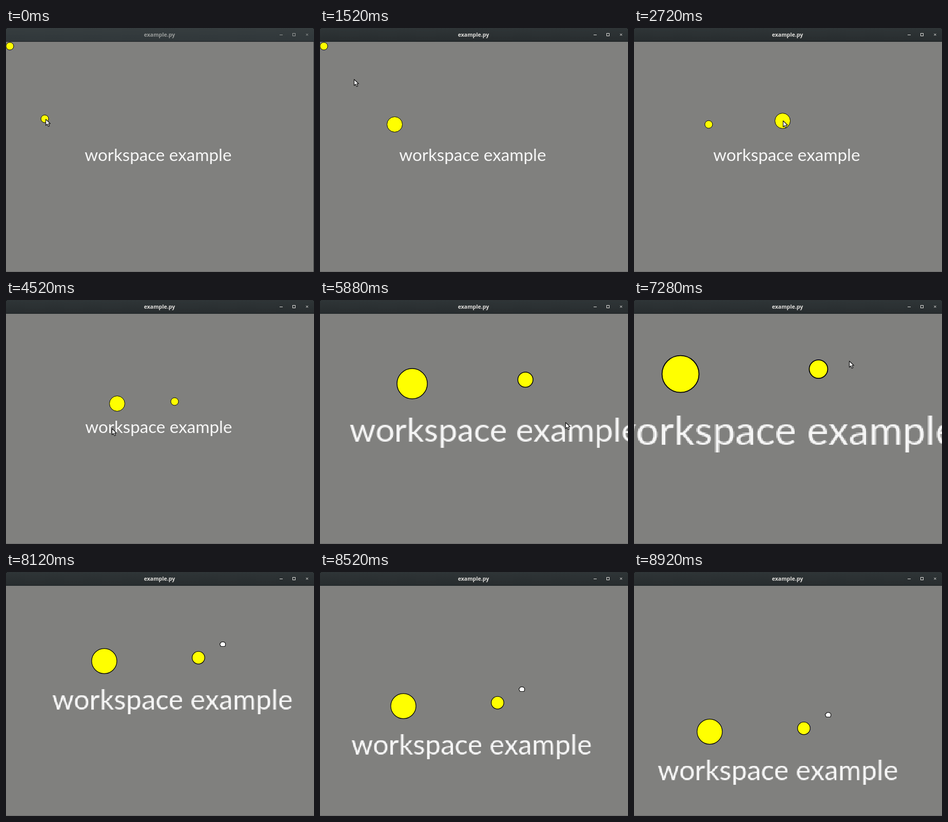
Recreate the animation shown at these times as an HTML page with a canvas. Size 600 px wide and 477 px high, loop 9 s.

```html
<!DOCTYPE html>
<html lang="en">
<head>
<meta charset="utf-8">
<title>example.py</title>
<style>
  html, body { margin: 0; width: 100%; height: 100%; overflow: hidden; background: #80807e; }
  canvas { display: block; }
</style>
</head>
<body>
<canvas id="stage" width="600" height="477"></canvas>
<script>
const W = 600, H = 477, BAR = 27, LOOP = 9000, TICK = 40;
const FOCUS_AT = 280, SETTLE_AT = 1240;
const ctx = document.getElementById('stage').getContext('2d');

// Each gesture takes the pointer to a point, dragging a ball or the view if named
const GESTURES = [
  { from: 119, to: 120, at: [74, 176] },
  { from: 300, to: 1060, at: [144, 187], drag: 'a' },
  { from: 1200, to: 1760, at: [8, 35] },
  { from: 1760, to: 2720, at: [290, 181], drag: 'b' },
  { from: 2720, to: 2960, at: [329, 198], drag: 'b' },
  { from: 3080, to: 3620, at: [144, 187] },
  { from: 3620, to: 4120, at: [215, 201], drag: 'a' },
  { from: 4280, to: 4520, at: [206, 251] },
  { from: 4880, to: 5720, at: [478, 239] },
  { from: 5920, to: 7240, at: [419, 119] },
  { from: 7400, to: 7680, at: [424, 89] },
  { from: 7680, to: 8120, at: [422, 141], drag: 'view' },
  { from: 8120, to: 8800, at: [373, 290], drag: 'view' },
  { from: 8800, to: 8920, at: [378, 279], drag: 'view' }
];

// Each zoom keeps the screen point `hub` fixed
const ZOOMS = [
  { from: 4560, to: 4720, scale: 1.25, hub: [206, 251] },
  { from: 4880, to: 5350, scale: 1.97, hub: [287, 236] },
  { from: 5900, to: 6640, scale: 3.12, hub: [501, 181] },
  { from: 6720, to: 7240, scale: 2.4, hub: [420, 116] },
  { from: 7400, to: 7600, scale: 1.638, hub: [414, 73] }
];

const mix = (a, b, k) => a + (b - a) * k;
const progress = (step, t) => Math.min(1, (t - step.from) / (step.to - step.from));

function sceneAt(t) {
  const scene = {
    pointer: [77, 178], a: [75, 177], b: [7, 35], view: [0, 0],
    scale: 1, picked: '', grabbing: false
  };
  for (const step of ZOOMS.filter(z => z.from <= t)) {
    const scale = scene.scale * (step.scale / scene.scale) ** progress(step, t);
    scene.view = scene.view.map((v, i) => mix(step.hub[i], v, scale / scene.scale));
    scene.scale = scale;
  }
  for (const step of GESTURES.filter(g => g.from <= t)) {
    const next = scene.pointer.map((p, i) => Math.round(mix(p, step.at[i], progress(step, t))));
    if (step.drag) {
      scene[step.drag] = scene[step.drag].map((v, i) => v + next[i] - scene.pointer[i]);
      scene.grabbing = step.drag === 'view';
      if (!scene.grabbing) scene.picked = step.drag;
    }
    scene.pointer = next;
  }
  return scene;
}

// The label is rastered once, so zooming shows its pixels
const label = document.createElement('canvas');
label.width = 300;
label.height = 50;
function drawLabel() {
  const c = label.getContext('2d');
  c.font = '33.2px Lato, Carlito, sans-serif';
  c.fillStyle = '#f6f6f6';
  c.fillText('workspace example', 3.2, 35);
}

function drawBall([x, y], radius, scale) {
  ctx.beginPath();
  ctx.arc(x, y, radius, 0, Math.PI * 2);
  ctx.fillStyle = '#ffff00';
  ctx.strokeStyle = '#000';
  ctx.lineWidth = Math.max(1, 0.75 * scale);
  ctx.fill();
  ctx.stroke();
}

function drawWorld(scene, settled) {
  const { scale, view, picked } = scene;
  const project = point => point.map((p, i) => view[i] + p * scale);
  ctx.imageSmoothingEnabled = false;
  ctx.drawImage(label, ...project([settled ? 151 : 150, 225]),
    label.width * scale, label.height * scale);
  for (const name of ['a', 'b']) {
    const centre = project(scene[name]).map(v => v + 0.5);
    drawBall(centre, (picked === name ? 15 : 7.5) * scale, scale);
  }
}

function drawBar(focused) {
  const shade = ctx.createLinearGradient(0, 0, 0, BAR);
  shade.addColorStop(0, focused ? '#2f3537' : '#363d3f');
  shade.addColorStop(1, focused ? '#272c2e' : '#30373a');
  ctx.fillStyle = '#000';
  ctx.fillRect(0, 0, W, BAR);
  ctx.fillStyle = shade;
  ctx.beginPath();
  ctx.roundRect(0, 0, W, BAR - 1, [3, 3, 0, 0]);
  ctx.fill();
  ctx.fillStyle = '#1f2426';
  ctx.fillRect(0, BAR - 1, W, 1);

  ctx.fillStyle = ctx.strokeStyle = focused ? '#dfdedb' : '#989b9a';
  ctx.font = 'bold 10.6px "Open Sans", "Noto Sans", sans-serif';
  ctx.textAlign = 'center';
  ctx.fillText('example.py', 299, 17);
  ctx.lineWidth = 1;
  ctx.fillRect(533, 13, 6, 1);
  ctx.strokeRect(558.5, 10.5, 5, 5);
  ctx.stroke(new Path2D('M584.5 11l4 4m0-4l-4 4'));
}

const ARROW = new Path2D('M.5 .5V12.5L3.4 9.8L5.4 14.5L7.6 13.5L5.6 9H9.3Z');
const FIST = new Path2D('M-5.5 0Q-5.5-2-3.5-2V-3Q-2.5-5-1-4Q0-5.5 1.5-4Q3-5 3.8-3Q5.5-3 5.5-1V2L4.5 4.5H-3.5Z');

function drawPointer([x, y], grabbing) {
  const shape = grabbing ? FIST : ARROW;
  ctx.save();
  ctx.translate(x, y);
  ctx.lineJoin = 'round';
  ctx.lineWidth = 1.2;
  ctx.fillStyle = '#fff';
  ctx.strokeStyle = '#111';
  ctx.fill(shape);
  ctx.stroke(shape);
  ctx.restore();
}

function draw(t) {
  const scene = sceneAt(t), settled = t >= SETTLE_AT;
  ctx.fillStyle = '#80807e';
  ctx.fillRect(0, 0, W, H);
  drawWorld(scene, settled);
  ctx.fillStyle = '#6a6a69';
  ctx.fillRect(0, H - 1, W, 1);
  if (!settled) {
    ctx.fillStyle = '#3b3e3e';
    ctx.fillRect(W - 1, BAR, 1, H - BAR);
  }
  drawBar(t >= FOCUS_AT);
  drawPointer(scene.pointer, scene.grabbing);
}

const start = performance.now();
function frame() {
  const t = (performance.now() - start) % LOOP;
  draw(Math.floor(t / TICK) * TICK);
  requestAnimationFrame(frame);
}
drawLabel();
frame();
</script>
</body>
</html>
```
